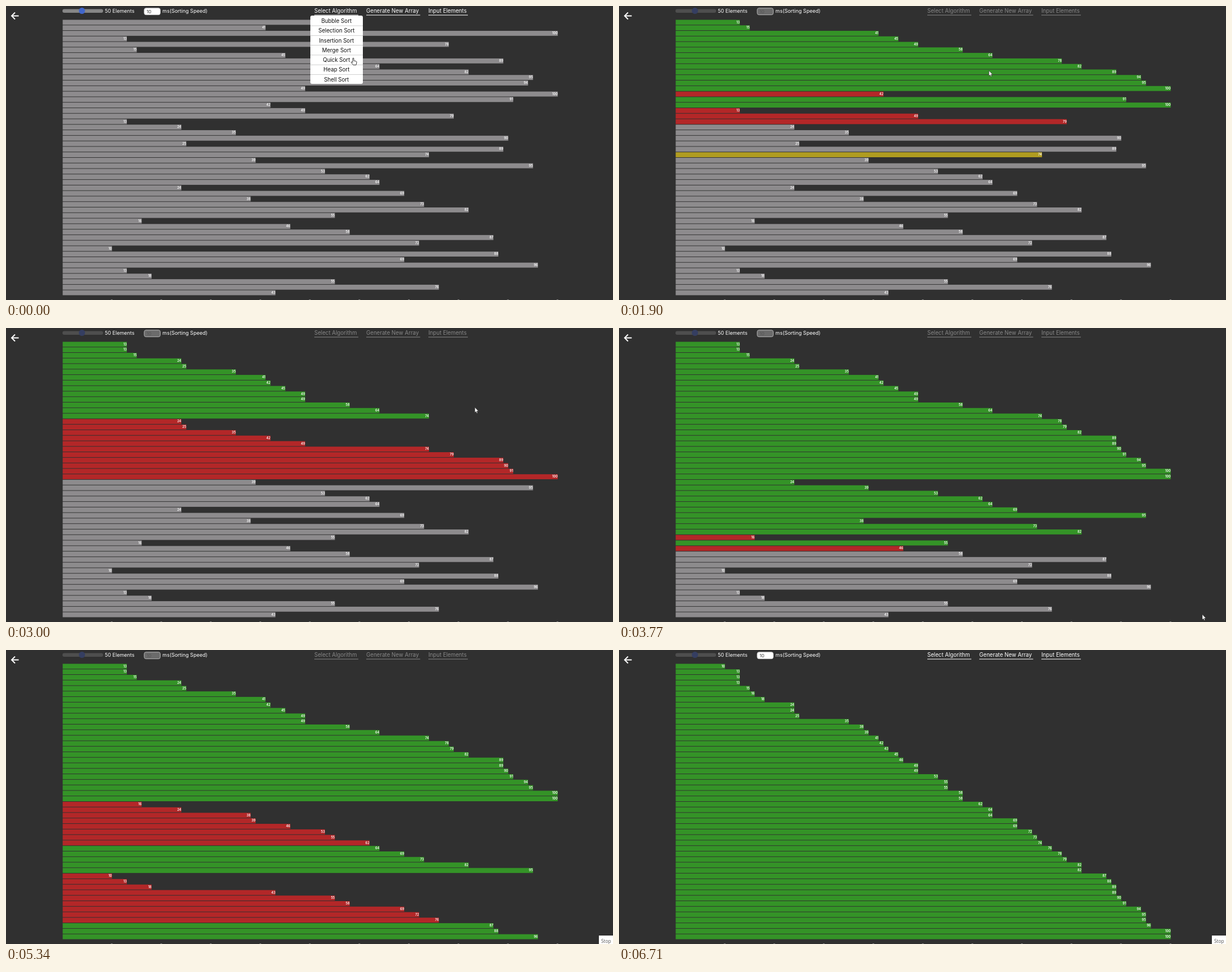
An HTML page that plays this animation: 1075x521 px, repeating every 7.08 s.

```html
<!DOCTYPE html>
<html lang="en">
<head>
<meta charset="utf-8">
<title>Merge sort</title>
<style>
  html, body { margin: 0; width: 100%; height: 100%; overflow: hidden; background: #303030; }
  svg { display: block; width: 1075px; height: 521px; font-family: Inter, "Open Sans", sans-serif; }
  text { fill: #fff; }
  .label { font-size: 9px; }
  .num { font-size: 5.6px; font-weight: 600; text-anchor: end; }
  .nav text, .item { font-size: 9.7px; }
  .nav rect { fill: #fff; }
  .item { fill: #111; text-anchor: middle; }
  .track { fill: #868686; }
  .thumb { fill: #4166cb; }
  .field { fill: #fff; stroke: #ccc; }
  .value { font-size: 8px; fill: #333; }
  .busy .nav text, .busy .nav rect { fill: #878787; }
  .locked .track { fill: #4e4e4e; }
  .locked .thumb { fill: #353e61; }
  .busy .field { fill: #6b6b6b; stroke: #b4b4b4; }
  .busy .value { fill: #555; }
  .tip text { font: 8.3px "Open Sans", "Noto Sans", sans-serif; fill: #555; }
</style>
</head>
<body>
<svg id="stage" viewBox="0 0 1075 521">
  <rect width="1075" height="521" fill="#303030"/>
  <path d="M22.5 17.5H10.5M16 11.5L10 17.5L16 23.5" fill="none" stroke="#fff" stroke-width="2"/>
  <rect class="track" x="100" y="5.5" width="72" height="6.5" rx="3.2"/>
  <circle class="thumb" cx="134.5" cy="8.5" r="5.5"/>
  <text class="label" x="175" y="12">50 Elements</text>
  <rect class="field" x="244.8" y="3.8" width="28.4" height="11.8" rx="3"/>
  <text class="value" x="249" y="12.5">10</text>
  <text class="label" x="277" y="12">ms(Sorting Speed)</text>
  <g class="nav">
    <text x="546" y="12">Select Algorithm</text><rect x="546" y="15.6" width="78" height="1"/>
    <text x="638" y="12">Generate New Array</text><rect x="638" y="15.6" width="95.5" height="1"/>
    <text x="748" y="12">Input Elements</text><rect x="748" y="15.6" width="70" height="1"/>
  </g>
  <g id="bars"></g>
  <g id="ticks" fill="#888"></g>
  <g id="menu"><rect x="539" y="17" width="93" height="121" rx="3" fill="#fff"/></g>
  <g id="tip" class="tip">
    <rect x="1050" y="506" width="26" height="16" fill="#fff"/>
    <text x="1054" y="518.5">Stop</text>
  </g>
  <g id="cursor" stroke="#222" fill="#fff" stroke-linejoin="round">
    <path id="hand" stroke-width=".9"
      d="M-1 .8Q0-.6 1 .8V5L5.2 6Q6.2 6.4 6 8L5 12.6H0L-3.6 8.2Q-3.8 6.6-2.4 7L-1 8.2Z"/>
    <path id="arrow" stroke-width=".6"
      d="M0 0V9.4L2.1 7.5L3.5 10.8L5 10.1L3.6 7L6.4 6.8Z"/>
  </g>
</svg>
<script>
const LOOP = 7080, START = 590, LEAVE = 3850, TIP = 4500, END = 6695;
const GRAY = '#8d8b8d', GREEN = '#349327', RED = '#b32728', GOLD = '#b09c20';
const TOP = 24.45, PITCH = 9.78, SCALE = 8.772;

// The unsorted input
const initial = [
  58, 41, 100, 13, 78, 15, 45, 89, 64, 82, 95, 94, 49, 100, 91, 42, 49,
  79, 13, 24, 35, 90, 25, 89, 74, 39, 95, 53, 62, 64, 24, 69, 38, 73,
  82, 55, 16, 46, 58, 87, 72, 10, 88, 69, 96, 13, 18, 55, 76, 43];

// [time, sort progress]; a write costs 1, a highlight 0.5
const pace = [[START, 0], [1900, 90.75], [3000, 166.9], [4770, 285.7], [5940, 366.7], [6690, 429]];
// [time, x, y]
const path = [[0, 615, 92], [START, 612, 76], [1900, 655, 114.5], [3000, 830, 140], [3770, 1033, 507.5]];

const $ = id => document.getElementById(id);
function add(parent, tag, attrs, text) {
  const el = document.createElementNS('http://www.w3.org/2000/svg', tag);
  for (const k in attrs) el.setAttribute(k, attrs[k]);
  if (text) el.textContent = text;
  return parent.appendChild(el);
}
function show(el, on) { el.style.display = on ? '' : 'none'; }
function sample(keys, t, col) {
  const i = keys.findIndex(key => key[0] > t);
  if (i < 0) return keys[keys.length - 1][col];
  if (i === 0) return keys[0][col];
  const a = keys[i - 1], b = keys[i];
  return a[col] + (b[col] - a[col]) * (t - a[0]) / (b[0] - a[0]);
}

// Record every step of the sort
const ops = [];
let clock = 0;
function step(cost, row, color, value) {
  clock += cost;
  ops.push({ at: clock, row, color, value });
}
function merge(a, lo, mid, hi) {
  const left = a.slice(lo, mid + 1), right = a.slice(mid + 1, hi + 1);
  const mark = row => step(0.5, row, RED);
  mark(mid + 1);
  for (let i = 0; i < left.length; i++) {
    if (i + 1 < right.length) mark(mid + 2 + i);
    mark(lo + i);
  }
  for (let k = lo; k <= hi; k++) {
    const useLeft = !right.length || (left.length && left[0] <= right[0]);
    a[k] = (useLeft ? left : right).shift();
    step(1, k, GREEN, a[k]);
  }
}
function mergeSort(a, lo, hi) {
  if (lo >= hi) return;
  const mid = (lo + hi) >> 1;
  step(0, mid, GOLD);
  mergeSort(a, lo, mid);
  mergeSort(a, mid + 1, hi);
  merge(a, lo, mid, hi);
}
mergeSort(initial.slice(), 0, initial.length - 1);

const bars = initial.map((_, i) => {
  const y = TOP + i * PITCH;
  return {
    rect: add($('bars'), 'rect', { x: 100.4, y, height: PITCH - 0.95 }),
    num: add($('bars'), 'text', { class: 'num', y: y + 6.1 })
  };
});
for (let i = 1; i <= 10; i++) {
  add($('ticks'), 'rect', { x: 98 + 10 * i * SCALE, y: 520, width: 3, height: 1 });
}
['Bubble', 'Selection', 'Insertion', 'Merge', 'Quick', 'Heap', 'Shell'].forEach((name, i) => {
  const y = 26.3 + i * 17.3;
  add($('menu'), 'text', { class: 'item', x: 585.3, y: y + 3.6 }, name + ' Sort');
  if (i) add($('menu'), 'rect', { x: 539, y: y - 9, width: 93, height: 0.8, fill: '#c4c4c4' });
});

function draw(t) {
  const started = t >= START;
  const values = initial.slice(), colors = initial.map(() => GRAY);
  if (started) {
    const progress = sample(pace, t, 1);
    for (const op of ops) {
      if (op.at > progress) break;
      colors[op.row] = op.color;
      if (op.value) values[op.row] = op.value;
    }
  }
  bars.forEach(({ rect, num }, i) => {
    const w = values[i] * SCALE;
    rect.setAttribute('width', w - 0.4);
    rect.setAttribute('fill', colors[i]);
    num.setAttribute('x', 99.8 + w);
    num.textContent = values[i];
  });
  $('stage').classList.toggle('busy', started && t < END);
  $('stage').classList.toggle('locked', started);
  show($('menu'), !started);
  show($('hand'), !started);
  show($('arrow'), started);
  show($('cursor'), t < LEAVE);
  show($('tip'), t >= TIP);
  $('cursor').setAttribute('transform', `translate(${sample(path, t, 1)} ${sample(path, t, 2)})`);
}

const begin = performance.now();
function frame() {
  draw((performance.now() - begin) % LOOP);
  requestAnimationFrame(frame);
}
frame();
</script>
</body>
</html>
```
